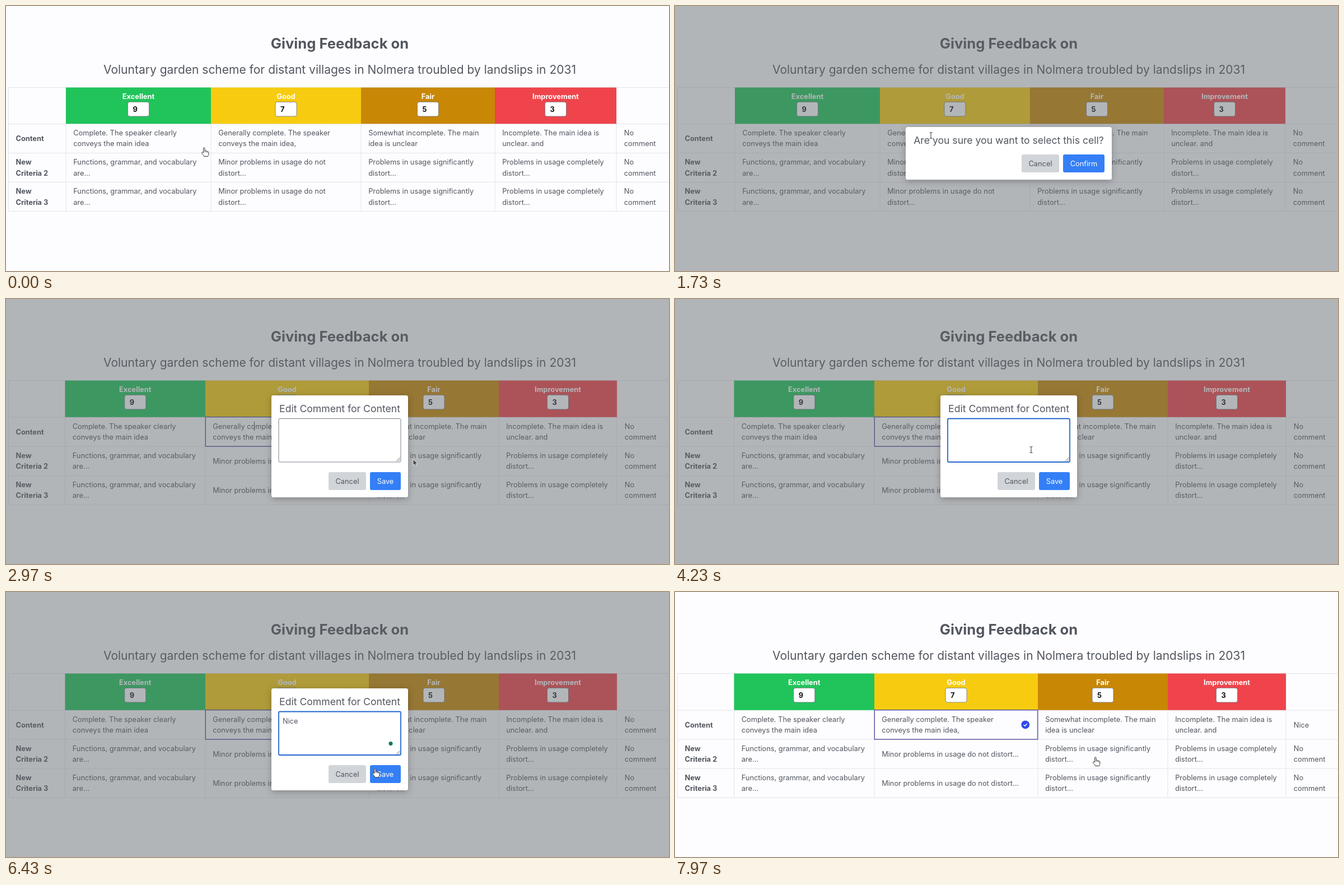
Animation of 1184 by 473 pixels, one loop 8000 ms. Source, as an HTML page:

```html
<!DOCTYPE html>
<html lang="en">
<head>
<meta charset="utf-8">
<title>Giving feedback</title>
<style>
  html, body { margin: 0; width: 100%; height: 100%; overflow: hidden; background: #fdfdff; }
  svg { display: block; width: 1184px; height: 473px; font-family: Inter, sans-serif; }
  .dialog { filter: drop-shadow(0 3px 6px rgba(0, 0, 0, .25)); }
</style>
</head>
<body>
<svg id="stage" viewBox="0 0 1184 473"></svg>
<script>
const INK = '#52565f', LINE = '#e2e3ef', BLUE = '#347ff6';
const LOOP = 8000, ASK = 1700, EDIT = 2500, FOCUS = 3600, SAVE = 6800;
const KEYS = [5000, 5200, 5400, 5620];
const WORD = 'Nice';

// Cursor stops: time, x, y
const PATH = [
  [0, 354, 253], [400, 354, 253], [1350, 457, 231], [1850, 457, 231],
  [2350, 727, 286], [3050, 727, 286], [3500, 636, 269], [5900, 636, 269],
  [6500, 660, 317], [7150, 660, 317], [7900, 751, 295], [LOOP, 751, 295]
];
// Cursor shapes: start time, shape
const SHAPES = [
  [0, 'hand'], [ASK, 'beam'], [2000, 'arrow'], [2200, 'hand'], [EDIT, 'arrow'],
  [3200, 'beam'], [6200, 'arrow'], [6350, 'hand']
];

const HEADS = [
  ['Excellent', 9, '#20c45a'], ['Good', 7, '#f7cc10'],
  ['Fair', 5, '#c88705'], ['Improvement', 3, '#ef444b']
];
const FUNCTIONS = 'Functions, grammar, and vocabulary|are...';
const MINOR = 'Minor problems in usage do not|distort...';
const SIGNIFICANT = 'Problems in usage significantly|distort...';
const COMPLETE = 'Problems in usage completely|distort...';
const ROWS = [
  ['Content', 'Complete. The speaker clearly|conveys the main idea',
    'Generally complete. The speaker|conveys the main idea,',
    'Somewhat incomplete. The main|idea is unclear', 'Incomplete. The main idea is|unclear. and'],
  ['New|Criteria 2', FUNCTIONS, MINOR, SIGNIFICANT, COMPLETE],
  ['New|Criteria 3', FUNCTIONS, MINOR, SIGNIFICANT, COMPLETE]
];

// y is the middle of the line box
function text(str, x, y, { size = 12.8, weight = 400, fill = INK, anchor = 'start', id = '' } = {}) {
  return `<text id="${id}" x="${x}" y="${y + size * .364}" font-size="${size}" font-weight="${weight}"
    fill="${fill}" text-anchor="${anchor}">${str}</text>`;
}
function lines(str, x, y, opts) {
  const parts = str.split('|');
  return parts.map((s, i) => text(s, x, y + (i - (parts.length - 1) / 2) * 19.2, opts)).join('');
}
function rect(x, y, w, h, fill, extra = '') {
  return `<rect x="${x}" y="${y}" width="${w}" height="${h}" fill="${fill}" ${extra}/>`;
}
function path(d, stroke, width = 1, fill = 'none') {
  return `<path d="${d}" stroke="${stroke}" stroke-width="${width}" fill="${fill}" stroke-linejoin="round"/>`;
}
function group(id, body, extra = '') {
  return `<g id="${id}" ${extra}>${body}</g>`;
}
function caret(id, x, y) {
  return rect(x, y - 8, 1, 16, '#333', `id="${id}"`);
}

function table(x, dy, chosen) {
  const tops = [145.5, 210.5, 262.5, 314.5, 366.5].map((y, i) => i && chosen ? y + .6 : y);
  let out = path(tops.map(y => `M4.5 ${y}H1184`).join('') +
    [4.5, ...x].map(v => `M${v} 145.5V${tops[4]}`).join(''), LINE);
  HEADS.forEach(([name, score, fill], i) => {
    const mid = (x[i] + x[i + 1]) / 2;
    out += rect(x[i], 145.5, x[i + 1] - x[i], tops[1] - 145.8, fill) +
      text(name, mid, 161, { weight: 700, fill: '#fff', anchor: 'middle' }) +
      rect(mid - 19, 171.3, 38, 25.6, '#fff', 'rx="3.5" stroke="#6b7280" stroke-width=".8"') +
      text(score, mid - 10, 184, { weight: 700, fill: '#111' });
  });
  ROWS.forEach(([name, ...cells], r) => {
    const y = 236.2 + dy + r * 52.1;
    out += lines(name, 17.5, y, { weight: 700 });
    cells.forEach((cell, i) => {
      const joined = chosen && cell === MINOR;
      out += lines(joined ? cell.replace('|', ' ') : cell, x[i] + 13.2, y);
    });
    const empty = lines('No|comment', x[4] + 13.8, y);
    out += chosen && !r
      ? group('noComment', empty) + group('comment', text(WORD, x[4] + 13.8, y))
      : empty;
  });
  if (chosen) {
    out += rect(x[1] + .3, 210.6, x[2] - x[1] - .6, 52.4, 'none', 'stroke="#5450a0" stroke-width="1.4"') +
      group('check', '<circle cx="625.7" cy="236.8" r="7.4" fill="#2f49ea"/>' +
        path('M622.6 237l2.2 2.2 4-4.2', '#fff', 1.4));
  }
  return out;
}

function button(label, x, y, w, fill, color) {
  return rect(x, y, w, 32, fill, 'rx="3"') +
    text(label, x + w / 2, y + 16, { fill: color, anchor: 'middle' });
}
function dialog(id, [x, y, w, h], title, action, actionWidth, body = '') {
  const right = x + w - 13, top = y + h - 45;
  return group(id, rect(x, y, w, h, '#fff', 'rx="3.5" class="dialog"') +
    text(title, x + w / 2, y + 24, { size: 17.6, anchor: 'middle' }) + body +
    button('Cancel', right - actionWidth - 74, top, 67, '#d1d5d9', INK) +
    button(action, right - actionWidth, top, actionWidth, BLUE, '#fff'));
}

const area = rect(487, 213.5, 218, 77.5, '#fff', 'id="area" rx="2"') +
  path('M697 289.5l6.5-6.5M700.5 289.5l3-3', '#555', .9) +
  text('', 494, 230, { id: 'typed' }) + caret('areaCaret', 494, 230) +
  '<circle id="dot" cx="687" cy="270.5" r="3.5" fill="#08795a"/>';

const hand = path('M-1.4 8V1C-1.4-.5 1-.5 1 1V5.5C1.5 4.7 3.2 4.8 3.4 6C4.2 5.4 5.6 5.8 5.7 6.9' +
  'C6.6 6.5 7.9 7 7.9 8.2V11C7.9 13 6.7 13.8 6.6 15.5H-.2C-.6 13.5-4 10.8-4.4 9.2C-4.6 7.6-2.6 7.2-1.4 9Z',
  '#333', 1, '#fff') + path('M1 5.5V8M3.4 6V8.5M5.7 6.9V9', '#333', .8);
const arrow = path('M0 0V11L2.6 8.7L4.3 12.4L6.1 11.6L4.5 8H8Z', '#fff', .8, '#444');
const beam = path('M-2.5-5.5C-.8-5.5 0-5 0-4C0-5 .8-5.5 2.5-5.5M0-4.5V4.5M-2.5 5.5C-.8 5.5 0 5 0 4C0 5 .8 5.5 2.5 5.5',
  '#444', 1.1);

const stage = document.getElementById('stage');
stage.innerHTML =
  rect(0, 0, 1184, 473, '#fdfdff') +
  text('Giving Feedback on', 596, 66.5, { size: 25.6, weight: 700, anchor: 'middle' }) +
  text('Voluntary garden scheme for distant villages in Nolmera troubled by landslips in 2031',
    596, 113, { size: 21, anchor: 'middle' }) +
  group('before', table([107, 366, 634, 873, 1090], 0, false)) +
  group('after', table([105.5, 356, 648, 880, 1091], .7, true)) +
  caret('cellCaret', 443, 227) + caret('pageCaret', 17, 280) +
  rect(0, 0, 1184, 473, 'rgba(95,100,104,.47)', 'id="shade"') +
  dialog('ask', [412, 216, 368, 94], 'Are you sure you want to select this cell?', 'Confirm', 74) +
  dialog('edit', [474, 172, 244, 182], 'Edit Comment for Content', 'Save', 55, area) +
  group('cursor', group('hand', hand) + group('arrow', arrow) + group('beam', beam));

const part = Object.fromEntries([...stage.querySelectorAll('[id]')].map(e => [e.id, e]));
const show = (id, on) => part[id].style.display = on ? '' : 'none';
const blink = (t, start) => (t - start) % 1060 < 530;
const ease = k => k * k * (3 - 2 * k);

function cursorAt(t) {
  const i = PATH.findIndex(p => p[0] > t);
  const [t0, x0, y0] = PATH[i - 1], [t1, x1, y1] = PATH[i];
  const k = ease((t - t0) / (t1 - t0));
  return [x0 + (x1 - x0) * k, y0 + (y1 - y0) * k];
}

function draw(t) {
  const editing = t >= EDIT && t < SAVE, focused = t >= FOCUS;
  show('before', t < EDIT);
  show('after', t >= EDIT);
  show('noComment', t < SAVE);
  show('comment', t >= SAVE);
  show('shade', t >= ASK && t < SAVE);
  show('ask', t >= ASK && t < EDIT);
  show('edit', editing);
  show('cellCaret', editing && !focused && blink(t, 2800));
  show('pageCaret', t >= SAVE && blink(t, 6950));

  const count = KEYS.filter(k => k <= t).length;
  part.typed.textContent = WORD.slice(0, count);
  part.area.setAttribute('stroke', focused ? '#2466cf' : '#6b7280');
  part.area.setAttribute('stroke-width', focused ? 1.8 : .9);
  show('dot', count > 0);
  show('areaCaret', focused && blink(t, count ? KEYS[count - 1] : FOCUS));
  part.areaCaret.setAttribute('x', 494 + (count && editing ? part.typed.getComputedTextLength() : 0));

  part.cursor.setAttribute('transform', `translate(${cursorAt(t)})`);
  const shape = SHAPES.filter(s => s[0] <= t).pop()[1];
  for (const id of ['hand', 'arrow', 'beam']) show(id, id === shape);
}

const start = performance.now();
function frame() {
  draw((performance.now() - start) % LOOP);
  requestAnimationFrame(frame);
}
frame();
</script>
</body>
</html>
```
